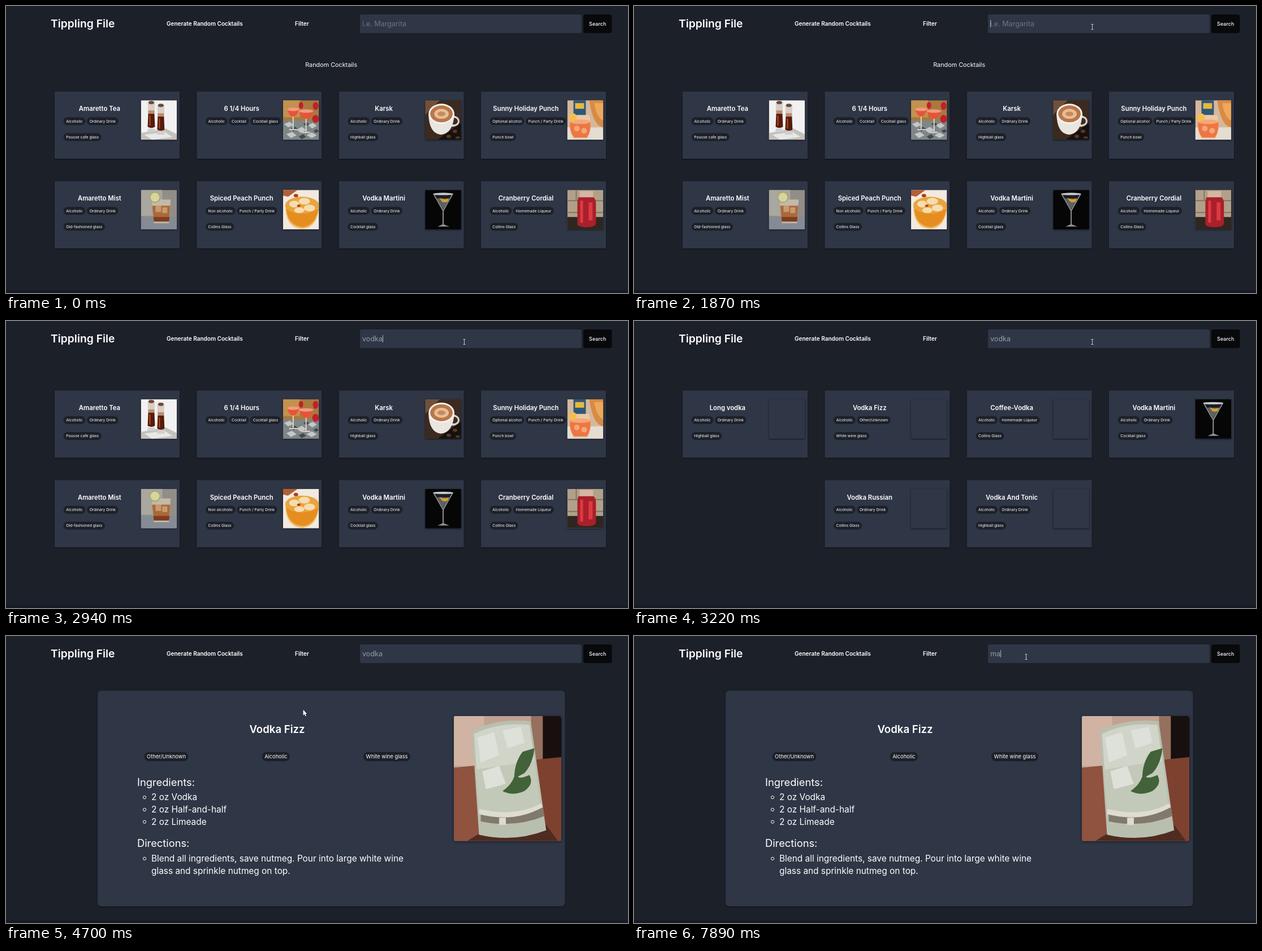
An HTML page with a canvas for the animation above (8000 ms loop, 1100 by 509 pixels).

```html
<!DOCTYPE html>
<html lang="en">
<head>
<meta charset="utf-8">
<title>Drinks</title>
<style>
  html, body { margin: 0; height: 100%; overflow: hidden; background: #1c2029; }
  canvas { display: block; }
</style>
</head>
<body>
<canvas id="stage" width="1100" height="509"></canvas>
<script>
const ctx = document.getElementById('stage').getContext('2d');
const LOOP = 8000, TICK = 67.1;
const PAGE = '#1c2029', PANEL = '#2f3646', INK = '#fff';
const COLS = [86, 337.3, 588.7, 840], CARD_W = 221, CARD_H = 119.3;

// Pictures: flat paths as [colour, path], in a 64 x 70 box.
const ALL = 'M0 0H64V70H0Z';
const oval = (x, y, rx, ry = rx) => `M${x - rx} ${y}a${rx} ${ry} 0 1 0 ${2 * rx} 0a${rx} ${ry} 0 1 0 ${-2 * rx} 0Z`;
const coffeeGlass = (x, y) => [
  ['#d8cdc4', `M${x} ${y}h13l-1 22h-11Z`],
  ['#6b4a38', oval(x + 6.5, y + 1, 5, 3)],
  ['#b98d70', `M${x + 1} ${y + 15}h11v7h-11Z`],
  ['#571a0b', `M${x + 1} ${y + 21}h11l1 23q-6 4-13 0Z`],
  ['#a9502a', `M${x + 3} ${y + 24}h2v18h-2Z`],
  ['#cfd0d2', `M${x + 1} ${y + 47}h11l2 6h-15Z`]];
const PICS = {
  tea: [['#f1f1f1', ALL], ['#c5c1bd', 'M0 58L44 50L64 60V70H0Z'], ['#e9e8e6', 'M6 61L42 56L56 65L20 70Z'],
    ...coffeeGlass(12, 3), ...coffeeGlass(29, 8)],
  weeks: [['#a9793f', ALL], ['#c2924f', 'M0 0H30V30H0Z'], ['#7f8687', 'M0 36H64V70H0Z'],
    ['#c3c8c7', 'M2 42l10-4 6 6-9 4ZM24 52l10-5 7 6-9 5ZM44 44l9-4 7 5-8 5ZM6 60l10-4 8 6-10 5ZM42 62l9-5 9 5-9 5Z'],
    ['#414a4d', 'M14 50l8-3 4 4-8 4ZM36 42l6-3 5 4-6 3ZM28 64l8-4 5 5-8 4ZM54 54l6-3 4 4-6 3Z'],
    ['#e2d6cc', 'M17 27h2v24h-2ZM40 30h2v26h-2ZM11 51h14v2h-14ZM34 56h14v2h-14Z'],
    ['#e9523a', 'M7 15H29Q25 29 18 29T7 15ZM28 18H54Q48 33 41 33T28 18Z'],
    ['#f39a7c', oval(18, 16, 11, 3) + oval(41, 19, 13, 3)],
    ['#c31f2c', oval(32, 9, 4, 6) + oval(58, 10, 5, 7) + oval(58, 33, 6, 7)]],
  karsk: [['#3c2a20', ALL], ['#71503a', 'M0 0H26L0 26Z'], ['#17100d', 'M22 70L64 40V70Z'],
    ['#54382a', oval(53, 55, 4, 3) + oval(42, 64, 4, 3) + oval(58, 66, 4, 2)],
    ['#d9d4cf', oval(49, 37, 12, 10)], ['#3c2a20', oval(51, 37, 7, 6)],
    ['#e9e5e1', 'M6 25Q7 59 28 61Q50 59 52 24Z'], ['#f5f2ee', oval(29, 24, 23, 18)],
    ['#b9764a', oval(29, 24, 20, 15)], ['#e6bd96', oval(29, 24, 13, 9)], ['#c68a5e', oval(29, 24, 7, 4)]],
  sunny: [['#d3b89d', ALL], ['#e5dcd2', 'M0 48H64V70H0Z'], ['#2d5878', 'M11 0H33V28H11Z'], ['#e8b83c', 'M14 5H30V15H14Z'],
    ['#d98a45', 'M39 0H64V48Q46 46 39 0Z'], ['#eda95b', 'M48 5H64V36Q52 30 48 5Z'],
    ['#ecc8a4', 'M7 26H39Q45 52 36 68H11Q1 52 7 26Z'], ['#ee7643', 'M5 38H41Q43 54 35 66H12Q3 54 5 38Z'],
    ['#f5a779', oval(23, 38, 18, 4) + oval(17, 50, 5) + oval(30, 54, 5)], ['#f3bf4d', oval(10, 30, 7)]],
  mist: [['#918d87', ALL], ['#aaa6a0', 'M0 0H38V46H0Z'], ['#858b95', 'M0 48H64V70H0Z'],
    ['#c3b9a9', 'M19 17H53L50 59H23Z'], ['#a86a3c', 'M20 28H52L50 56H23Z'], ['#7e3d1e', 'M22 48H51L50 56H23Z'],
    ['#c99a6c', 'M26 28h10v11h-10ZM38 31h9v10h-9Z'], ['#a7aa64', oval(25, 13, 10)], ['#d6d4a2', oval(25, 13, 8)]],
  peach: [['#f2e9df', ALL], ['#b35f37', 'M0 0H26L9 12L0 10Z'], ['#f0bc62', 'M4 26Q4 68 35 69Q62 66 64 28Z'],
    ['#e68d20', 'M6 34Q8 63 35 66Q58 63 63 34Z'], ['#e9a43e', oval(34, 27, 30, 15)],
    ['#f6ddb0', oval(20, 25, 9, 6) + oval(38, 20, 10, 6) + oval(47, 32, 10, 6) + oval(29, 36, 9, 5)],
    ['#a9401b', oval(28, 28, 3, 2) + oval(23, 10, 4, 3)]],
  martini: [['#060606', ALL], ['#8f9294', 'M14 7H50L33 37V61L43 65H22L31 61V37Z'], ['#1b1d20', 'M17 9H47L32 35Z'],
    ['#5d6164', 'M20 15H44L32 34Z'], ['#c9cccf', oval(32, 7, 18, 2)], ['#d7a02c', 'M25 14Q34 19 42 15L40 21Q31 24 28 18Z']],
  cordial: [['#b0a189', ALL], ['#85745f', 'M0 18H64V20H0ZM0 39H64V41H0ZM15 0H17V18H15ZM48 20H50V40H48Z'], ['#2f2621', 'M0 48H64V70H0Z'],
    ['#d7b5a4', 'M22 2H46V14H22Z'], ['#a9202a', 'M20 13H47Q51 17 51 24V60Q49 66 34 66T18 60V24Q18 17 20 13Z'],
    ['#dc3a43', 'M23 19H28V58H23ZM38 22H45V54H38Z']],
  long: [['#5d5654', ALL], ['#8e1720', 'M0 0H13L22 42L0 32Z'], ['#39383b', 'M30 0H64V46H30Z'], ['#d2cbc5', 'M0 42L64 46V70H0Z'],
    ['#6b6561', 'M36 70L64 52V70Z'], ['#c9b79d', 'M23 8H42L41 64H25Z'], ['#8e7150', 'M25 18H40V52H26Z'],
    ['#e4d7c0', 'M27 21h7v8h-7ZM32 32h7v8h-7ZM27 43h7v8h-7Z'], ['#eee8df', oval(32.5, 8, 9.5, 2)]],
  fizz: [['#c2a191', ALL], ['#d0b3a3', 'M0 0H18V28H0Z'], ['#96705f', 'M46 0H54V26H46Z'], ['#17100f', 'M53 0H64V26H53Z'],
    ['#7d412f', 'M0 29L64 23V70H0Z'], ['#8f5340', 'M0 29L14 28L17 70H0Z'], ['#4f2b21', 'M15 66L55 61L62 70H8Z'],
    ['#b9bfae', 'M10.8 8Q27 1 45.8 3L55 64Q36 71 15 66.5Z'], ['#d0d4c9', 'M12 10Q27 3 45 5L49 32L14 38Z'],
    ['#c3c9b8', 'M13 30L48 25L52 52Q36 57 15 52Z'],
    ['#dde1d9', 'M14 12L24 9L27 22L16 26ZM29 8L40 6L42 15L32 18ZM17 31L27 28L31 38L19 41Z'],
    ['#80796c', 'M16 55Q35 59 53 51L54 56Q36 63 16 59Z'], ['#dedcd1', 'M15 52Q36 57 52 49L53 51Q36 60 15 55ZM27 57h4v4h-4Z'],
    ['#42623a', 'M48 18Q47 27 42 32L36 35Q36 26 41 20ZM29 42Q34 39 36 34L38 33Q38 36 45 33Q48 38 42 42Q35 45 29 42Z']],
  coffee: [['#b79e82', ALL], ['#d8cab6', 'M0 0H64V22H0Z'], ['#8d6a4b', 'M0 54H64V70H0Z'],
    ['#ded2c3', 'M11 16H55L50 61Q33 67 17 61Z'], ['#a77a58', 'M13 25H53L49 55Q33 60 18 55Z'], ['#c8a583', oval(33, 24, 20, 7)],
    ['#6c6866', 'M18 18l12-5 5 8-11 5ZM36 20l10-4 4 8-10 3Z'], ['#dcd8d2', 'M20 18l9-3 2 4-9 3ZM37 20l8-3 2 4-8 2Z']],
  russian: [['#8e7e6b', ALL], ['#b3a490', 'M20 0H64V30H20Z'], ['#4e4338', 'M0 42H64V70H0Z'],
    ['#c0b5a4', 'M8 6H15V24L24 40V50H0V38L8 24Z'], ['#766a59', 'M4 36H20V49H3Z'],
    ['#a59a88', 'M28 20H49L46 65H31Z'], ['#e6e3dd', 'M31 3L35 2L41 55L37 56Z'],
    ['#323948', 'M31 7l4-2v3l-4 2ZM32 15l4-2v3l-4 2ZM33 23l4-2v3l-4 2ZM34 31l4-2v3l-4 2ZM35 39l4-2v3l-4 2Z'],
    ['#47562f', 'M38 15Q42 10 44 14L40 21Z'], ['#7e8b35', oval(21, 58, 9, 8)], ['#bcc383', oval(21, 56, 8, 6)]],
  tonic: [['#eeeae8', ALL], ['#d9cdc4', 'M0 50H64V70H0Z'], ['#b9bec0', 'M22 20H41L39 62H24Z'],
    ['#dfe3e4', 'M25 24h7v9h-7ZM31 35h7v9h-7ZM25 46h7v9h-7Z'], ['#91989b', 'M24 57H39V62H24Z'], ['#e4b843', 'M30 20Q31 15 43 16Q44 24 39 29Z']]
};

// Cards: title, tags (rows split by |), picture, column, row.
const RANDOM = [
  ['Amaretto Tea', 'Alcoholic,Ordinary Drink|Pousse cafe glass', 'tea', 0, 0],
  ['6 1/4 Hours', 'Alcoholic,Cocktail,Cocktail glass', 'weeks', 1, 0],
  ['Karsk', 'Alcoholic,Ordinary Drink|Highball glass', 'karsk', 2, 0],
  ['Sunny Holiday Punch', 'Optional alcohol,Punch / Party Drink|Punch bowl', 'sunny', 3, 0],
  ['Amaretto Mist', 'Alcoholic,Ordinary Drink|Old-fashioned glass', 'mist', 0, 1],
  ['Spiced Peach Punch', 'Non alcoholic,Punch / Party Drink|Collins Glass', 'peach', 1, 1],
  ['Vodka Martini', 'Alcoholic,Ordinary Drink|Cocktail glass', 'martini', 2, 1],
  ['Cranberry Cordial', 'Alcoholic,Homemade Liqueur|Collins Glass', 'cordial', 3, 1]];
const FOUND = [
  ['Long vodka', 'Alcoholic,Ordinary Drink|Highball glass', 'long', 0, 0],
  ['Vodka Fizz', 'Alcoholic,Other/Unknown|White wine glass', 'fizz', 1, 0],
  ['Coffee-Vodka', 'Alcoholic,Homemade Liqueur|Collins Glass', 'coffee', 2, 0],
  ['Vodka Martini', 'Alcoholic,Ordinary Drink|Cocktail glass', 'martini', 3, 0],
  ['Vodka Russian', 'Alcoholic,Ordinary Drink|Collins Glass', 'russian', 1, 1],
  ['Vodka And Tonic', 'Alcoholic,Ordinary Drink|Highball glass', 'tonic', 2, 1]];

const TYPING = [[0, ''], [2000, 'v'], [2140, 'vo'], [2200, 'vod'], [2400, 'vodk'], [2470, 'vodka'],
  [6360, 'vodk'], [6560, 'vod'], [6690, 'vo'], [6950, 'v'], [7290, ''], [7750, 'm'], [7890, 'ma']];
const CARET_ON = [[810, 1340], [1870, 3010], [3550, 4080], [5500, 6030], [6560, 7090], [7620, LOOP]];
const POINTER = [[60, 962, 509], [880, 806, 32], [940, 813, 38], [1010, 811, 37], [4010, 811, 37], [4500, 526, 131],
  [4890, 526, 131], [5240, 692, 37], [5430, 692, 37], [5500, 696, 39], [5630, 694, 37], [LOOP, 694, 37]];

function pointerAt(time) {
  const t = Math.floor((time + 5) / TICK) * TICK;
  const next = POINTER.findIndex(p => p[0] > t);
  if (next < 1) return next ? POINTER.at(-1).slice(1) : [962, 540];
  const [a, b] = [POINTER[next - 1], POINTER[next]];
  const u = (t - a[0]) / (b[0] - a[0]), e = u * u * (3 - 2 * u);
  return [a[1] + (b[1] - a[1]) * e, a[2] + (b[2] - a[2]) * e];
}

const inside = ([px, py], x, y, w, h) => px >= x && px <= x + w && py >= y && py <= y + h;

function box(x, y, w, h, color, radius = 0, blur = 0) {
  ctx.save();
  if (blur) Object.assign(ctx, { shadowColor: 'rgba(0,0,0,.6)', shadowBlur: blur, shadowOffsetY: 1 });
  ctx.fillStyle = color;
  ctx.beginPath();
  ctx.roundRect(x, y, w, h, radius);
  ctx.fill();
  ctx.restore();
}

// Text with its capitals centred on cy; returns its width.
function label(str, x, cy, size, { weight = 400, align = 'left', color = INK } = {}) {
  ctx.font = `${weight} ${size}px Inter, sans-serif`;
  ctx.textAlign = align;
  ctx.fillStyle = color;
  ctx.fillText(str, x, cy + size * .36);
  return ctx.measureText(str).width;
}

function pill(str, x, cy, size, color, centred) {
  ctx.font = `400 ${size}px Inter, sans-serif`;
  const pad = 4.6, w = ctx.measureText(str).width + pad * 2, h = size + 7.2;
  if (centred) x -= w / 2;
  box(x, cy - h / 2, w, h, color, h / 2);
  label(str, x + pad, cy, size);
  return w;
}

function picture(name, x, y, w, h, radius, blur) {
  box(x, y, w, h, PANEL, radius, blur);
  if (!name) return;
  ctx.save();
  ctx.beginPath();
  ctx.roundRect(x, y, w, h, radius);
  ctx.clip();
  ctx.translate(x, y);
  ctx.scale(w / 64, h / 70);
  for (const [color, path] of PICS[name]) {
    ctx.fillStyle = color;
    ctx.fill(new Path2D(path));
  }
  ctx.restore();
}

function card([title, tags, pic, col, row], top, t, loaded) {
  const x = COLS[col], y = top + row * 159;
  let hover = 0;
  for (let i = 0; i < 6; i++) if (inside(pointerAt(t - i * 25), x, y, CARD_W, CARD_H)) hover += 1 / 6;
  const scale = 1 + .047 * hover;
  ctx.save();
  ctx.translate(x + CARD_W / 2, y + CARD_H / 2);
  ctx.scale(scale, scale);
  ctx.translate(-CARD_W / 2, -CARD_H / 2);
  box(0, 0, CARD_W, CARD_H, PANEL, 1, 2);
  if (hover) {
    ctx.globalAlpha = hover;
    box(0, 0, CARD_W, CARD_H, '#0a0c10', 1);
    box(.8, .8, CARD_W - 1.6, CARD_H - 1.6, '#171b24');
    ctx.globalAlpha = 1;
  }
  label(title, 79.4, 30.3, 11.3, { weight: 600, align: 'center' });
  tags.split('|').forEach((line, i) => {
    let tx = 15.7;
    for (const tag of line.split(',')) tx += pill(tag, tx, 52.5 + i * 28.2, 6.75, hover > .5 ? '#0f1218' : PAGE) + 2.8;
  });
  picture(loaded && pic, 152.6, 15.5, 63.6, 70, 1, 3);
  ctx.restore();
}

function header(t) {
  label('Tippling File', 79, 31.3, 19.3, { weight: 600 });
  label('Generate Random Cocktails', 284, 31.7, 10.05, { weight: 600 });
  label('Filter', 511, 31.7, 10.05, { weight: 600 });
  box(626, 15, 392, 33, PANEL, 3);
  box(1021, 15, 50.5, 33, '#08090b', 4);
  label('Search', 1046.2, 31.5, 9, { weight: 500, align: 'center' });
  const typed = TYPING.findLast(k => k[0] <= t)[1];
  const width = label(typed || 'i.e. Margarita', 630, 31.5, 12.6, { color: typed ? '#959cab' : '#70747d' });
  if (CARET_ON.some(([on, off]) => t >= on && t < off))
    box(Math.round(630 + (typed && width)), 25, 1, 13, '#a9afbc');
}

function recipe() {
  box(162, 97, 826.5, 382.5, PANEL, 6, 2);
  label('Vodka Fizz', 479.5, 165.5, 18.6, { weight: 600, align: 'center' });
  pill('Other/Unknown', 283.5, 214, 9.25, PAGE, true);
  pill('Alcoholic', 477.3, 214, 9.25, PAGE, true);
  pill('White wine glass', 673.5, 214, 9.25, PAGE, true);
  label('Ingredients:', 232, 259, 18.3);
  label('Directions:', 232, 367.3, 18.3);
  ['2 oz Vodka', '2 oz Half-and-half', '2 oz Limeade'].forEach((s, i) => label(s, 257, 285.7 + i * 21.7, 15.4));
  label('Blend all ingredients, save nutmeg. Pour into large white wine', 257, 394.3, 15.4);
  label('glass and sprinkle nutmeg on top.', 257, 416, 15.4);
  ctx.strokeStyle = INK;
  ctx.lineWidth = 1;
  for (const y of [286.2, 307.9, 329.6, 394.8]) ctx.stroke(new Path2D(oval(245, y, 2.6)));
  picture('fizz', 792, 142, 190, 221.5, 3, 4);
}

function pointer([x, y]) {
  ctx.save();
  ctx.lineWidth = 1;
  if (inside([x, y], 626, 15, 392, 33)) {
    ctx.translate(Math.round(x) - .5, Math.round(y));
    ctx.strokeStyle = '#c3c8d1';
    ctx.stroke(new Path2D('M-2-4.5H2M-2 4.5H2M0-4.5V4.5'));
  } else {
    ctx.translate(x - .5, y - .5);
    const arrow = new Path2D('M0 0V10.5L2.4 8.3L4 12L5.6 11.3L4 7.7H7Z');
    ctx.strokeStyle = '#000';
    ctx.stroke(arrow);
    ctx.fillStyle = '#fff';
    ctx.fill(arrow);
  }
  ctx.restore();
}

function draw() {
  const t = performance.now() % LOOP;
  box(0, 0, 1100, 509, PAGE);
  box(0, 504.5, 1100, 5, '#181926');
  header(t);
  if (t >= 4700) recipe();
  else {
    const searched = t >= 2940;
    if (!searched) label('Random Cocktails', 575.2, 104.5, 10.8, { align: 'center' });
    for (const c of t < 3220 ? RANDOM : FOUND)
      card(c, searched ? 123.2 : 151.8, t, t < 3220 || t >= 3290 || c[2] === 'martini');
  }
  pointer(pointerAt(t));
  requestAnimationFrame(draw);
}
draw();
</script>
</body>
</html>
```
